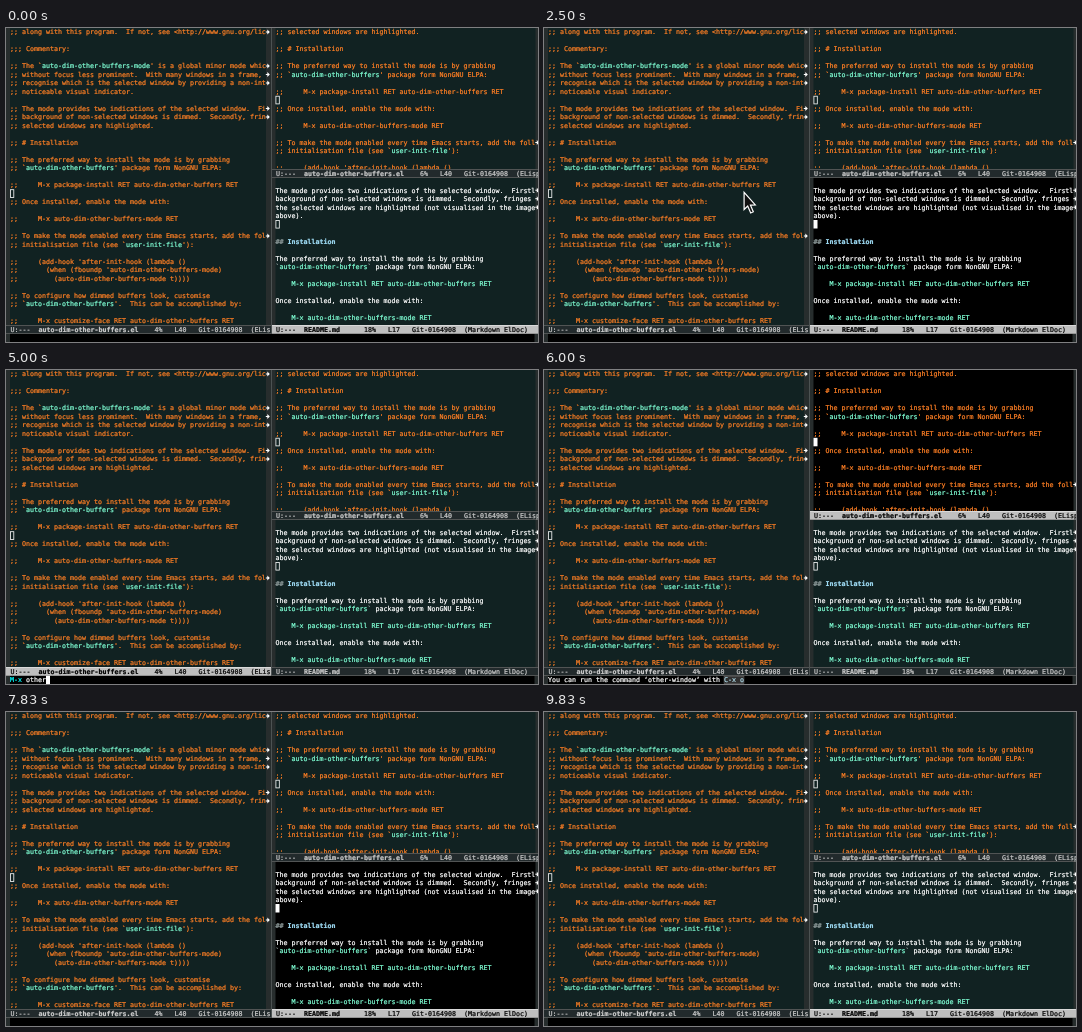
Write an HTML page with a canvas that moves like this. It is 532 px wide and 314 px high and loops after 10000 ms.

```html
<!DOCTYPE html>
<html lang="en">
<head>
<meta charset="utf-8">
<title>Dimmed windows</title>
<style>
html, body { margin: 0; width: 100%; height: 100%; overflow: hidden; background: #000; }
canvas { display: block; }
</style>
</head>
<body>
<canvas id="stage" width="532" height="314"></canvas>
<script>
const ctx = document.getElementById('stage').getContext('2d');
const LOOP = 10000, CW = 4, LH = 8.5;
const FONT = '6.65px "DejaVu Sans Mono", "Noto Sans Mono", monospace';
const DIM = '#112222', FRINGE = '#272d2d', COMMENT = '#ff7f24', QUOTED = '#7fffd4';
const HEAD = '#9fdcf5', MARKUP = '#8a9696';

const code = `;; along with this program.  If not, see <http://www.gnu.org/licenses/>.

;;; Commentary:

;; The \`auto-dim-other-buffers-mode' is a global minor mode which makes windows
;; without focus less prominent.  With many windows in a frame, the idea is to
;; recognise which is the selected window by providing a non-intrusive but still
;; noticeable visual indicator.

;; The mode provides two indications of the selected window.  Firstly, the
;; background of non-selected windows is dimmed.  Secondly, fringes on the
;; selected windows are highlighted.

;; # Installation

;; The preferred way to install the mode is by grabbing
;; \`auto-dim-other-buffers' package form NonGNU ELPA:

;;     M-x package-install RET auto-dim-other-buffers RET

;; Once installed, enable the mode with:

;;     M-x auto-dim-other-buffers-mode RET

;; To make the mode enabled every time Emacs starts, add the following to your
;; initialisation file (see \`user-init-file'):

;;     (add-hook 'after-init-hook (lambda ()
;;       (when (fboundp 'auto-dim-other-buffers-mode)
;;         (auto-dim-other-buffers-mode t))))

;; To configure how dimmed buffers look, customise
;; \`auto-dim-other-buffers'.  This can be accomplished by:

;;     M-x customize-face RET auto-dim-other-buffers RET`.split('\n');

const readme = `
The mode provides two indications of the selected window.  Firstly, the
background of non-selected windows is dimmed.  Secondly, fringes on the
the selected windows are highlighted (not visualised in the image
above).


## Installation

The preferred way to install the mode is by grabbing
\`auto-dim-other-buffers\` package form NonGNU ELPA:

    M-x package-install RET auto-dim-other-buffers RET

Once installed, enable the mode with:

    M-x auto-dim-other-buffers-mode RET`.split('\n');
readme[3] += ' ';

const windows = {
  left: { x: 0, y: 0, w: 265, bar: 297, tx: 4, cols: 64, top: 4, lines: code, cursor: 19,
    name: 'auto-dim-other-buffers.el', info: '    4%   L40   Git-0164908  (ELisp/l ElDoc)' },
  upper: { x: 266, y: 0, w: 266, bar: 141, tx: 269.5, cols: 65, top: 4, lines: code.slice(11, 28), cursor: 8,
    name: 'auto-dim-other-buffers.el', info: '    6%   L40   Git-0164908  (ELisp/l ElDoc)' },
  lower: { x: 266, y: 150, w: 266, bar: 297, tx: 269.5, cols: 65, top: 153.7, lines: readme, cursor: 5,
    name: 'README.md', info: '      18%   L17   Git-0164908  (Markdown ElDoc)' }
};

// From each time on: window with the bright mode line, window with focus
const states = [
  [0, 'lower', null], [600, 'lower', 'lower'], [3000, 'left', 'left'],
  [4200, 'left', 'mini'], [5950, 'upper', 'upper'], [7330, 'lower', 'lower'],
  [9600, 'lower', null]
];

function rect(x, y, w, h, color) {
  ctx.fillStyle = color;
  ctx.fillRect(x, y, w, h);
}

// A hairline outline gives the small type its weight
function text(s, x, mid, color, bold) {
  ctx.font = (bold ? 'bold ' : '') + FONT;
  ctx.fillStyle = ctx.strokeStyle = color;
  ctx.lineWidth = 0.22;
  ctx.fillText(s, x, mid + 2.4);
  ctx.strokeText(s, x, mid + 2.4);
}

function runs(line, markdown) {
  if (markdown) {
    if (line.startsWith('##')) return [['## ', MARKUP, true], [line.slice(3), HEAD, true]];
    if (line.startsWith('    ')) return [[line, QUOTED]];
  }
  const base = markdown ? '#fff' : COMMENT, mark = markdown ? MARKUP : COMMENT;
  return line.split(/(`[^'`]*['`])/).flatMap(part => part[0] === '`'
    ? [['`', mark], [part.slice(1, -1), QUOTED], [part.slice(-1), mark]]
    : [[part, base]]);
}

function truncMark(x, y) {
  rect(x - 2, y - 0.5, 3, 1, '#fff');
  ctx.beginPath();
  ctx.moveTo(x - 0.5, y - 2.5);
  ctx.lineTo(x + 2, y);
  ctx.lineTo(x - 0.5, y + 2.5);
  ctx.fill();
}

function caret(x, mid, solid) {
  if (solid) return rect(x, mid - 4.2, CW, LH, '#fff');
  ctx.strokeStyle = '#fff';
  ctx.lineWidth = 0.8;
  ctx.strokeRect(x + 0.4, mid - 3.8, CW - 0.6, LH - 0.8);
}

function modeLine(win, active) {
  const { x, w, bar, tx } = win, mid = bar + 4.5;
  const ink = active ? '#000' : '#ccc';
  rect(x, bar, w, 9, active ? '#bfbfbf' : '#222a2c');
  rect(x, bar, w, 0.7, active ? '#e6e6e6' : '#666');
  rect(x, bar + 8.3, w, 0.7, active ? '#858585' : '#666');
  text('U:---', tx + 0.5, mid, ink);
  text(win.name, tx + 7 * CW + 0.5, mid, ink, true);
  text(win.info, tx + (7 + win.name.length) * CW + 0.5, mid, ink);
}

function drawWindow(win, active, focused) {
  const { x, y, w, bar, tx, cols, top } = win;
  const right = tx + cols * CW;
  ctx.save();
  ctx.beginPath();
  ctx.rect(x, y, w, bar + 9 - y);
  ctx.clip();
  rect(x, y, w, bar - y, FRINGE);
  rect(tx, y, right - tx, bar - y, focused ? '#000' : DIM);
  win.lines.forEach((line, i) => {
    const mid = top + i * LH;
    let col = 0;
    for (const [s, color, bold] of runs(line, win.lines === readme)) {
      const shown = s.slice(0, Math.max(0, cols - col));
      text(shown, tx + col * CW, mid, color, bold);
      col += s.length;
    }
    if (line.length > cols) truncMark(right + 1.8, mid);
  });
  caret(tx, top + win.cursor * LH, focused);
  modeLine(win, active);
  ctx.restore();
}

function drawMini(t) {
  const mid = 310;
  rect(0, 306, 532, 8, FRINGE);
  rect(4, 306, 524.5, 8, '#000');
  if (t >= 4200 && t < 5950) {
    const typed = 'other-window'.slice(0, Math.max(0, Math.floor((t - 4330) / 121)));
    text('M-x ', 4, mid, '#0ff');
    text(typed, 20, mid, '#fff');
    caret(20 + typed.length * CW, mid, true);
  } else if (t >= 5950 && t < 7330) {
    text('You can run the command ‘other-window’ with ', 4, mid, '#fff');
    rect(180, 306, 20, 8, '#303030');
    ctx.strokeStyle = '#666';
    ctx.lineWidth = 0.5;
    ctx.strokeRect(180, 306.3, 20, 7.4);
    text('C-x o', 180, mid, '#add8e6');
  }
}

function drawPointer(t) {
  if (t < 1250 || t >= 4200) return;
  const p = Math.min(1, (t - 1250) / 1100), e = p * p * (3 - 2 * p);
  ctx.save();
  ctx.translate(340 - 140.5 * e, 215 - 51.5 * e);
  ctx.beginPath();
  [[0.6, 0.8], [0.6, 18], [4.2, 14.6], [7.2, 21.5], [9.8, 20.3], [6.9, 13.6], [11.8, 13.4]]
    .forEach(([x, y]) => ctx.lineTo(x, y));
  ctx.closePath();
  ctx.fillStyle = '#111';
  ctx.fill();
  ctx.strokeStyle = '#fff';
  ctx.lineWidth = 1.2;
  ctx.stroke();
  ctx.restore();
}

function draw(t) {
  const [, active, focus] = states.filter(s => s[0] <= t).pop();
  rect(0, 0, 532, 314, '#000');
  for (const [id, win] of Object.entries(windows)) drawWindow(win, id === active, id === focus);
  rect(265, 0, 1, 306, '#4c5252');
  drawMini(t);
  drawPointer(t);
}

const start = performance.now();
function tick() {
  draw((performance.now() - start) % LOOP);
  requestAnimationFrame(tick);
}
tick();
</script>
</body>
</html>
```
